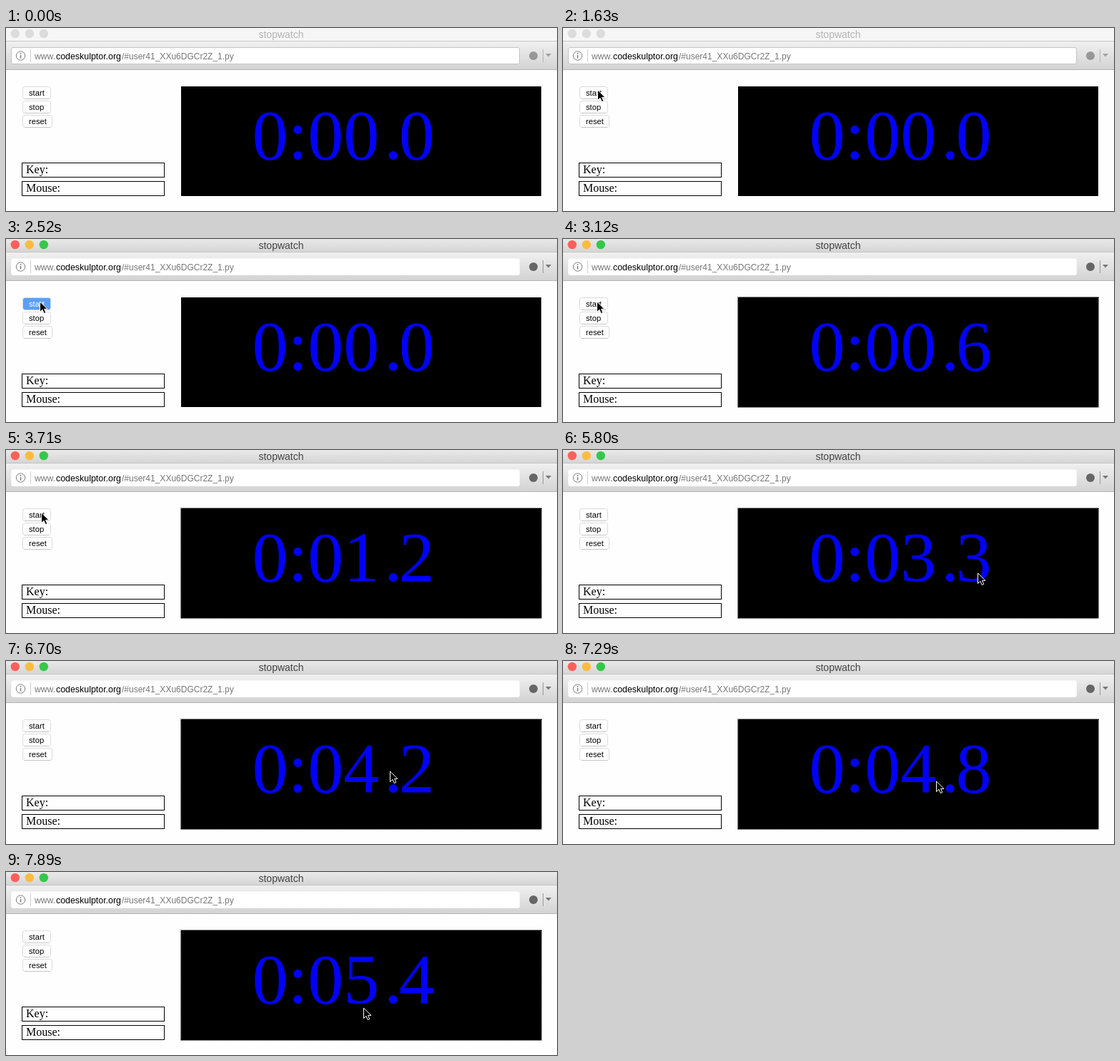
An HTML page that plays this animation: 771 px wide and 257 px high, repeating every 8000 ms.

```html
<!DOCTYPE html>
<html lang="en">
<head>
<meta charset="utf-8">
<title>stopwatch</title>
<style>
  html, body { margin: 0; width: 100%; height: 100%; overflow: hidden; background: #fefefe; }
  svg { display: block; width: 771px; height: 257px; }
  text { font-family: "Liberation Sans", Arial, sans-serif; white-space: pre; }
  .serif { font-family: "Liberation Serif", "Times New Roman", serif; }
</style>
</head>
<body>
<svg viewBox="0 0 771 257">
  <defs>
    <linearGradient id="titleFill" x2="0" y2="1">
      <stop offset="0" stop-color="#e9e9e9"/><stop offset="1" stop-color="#d5d5d5"/>
    </linearGradient>
    <linearGradient id="toolFill" x2="0" y2="1">
      <stop offset="0" stop-color="#f0f0f0"/><stop offset="1" stop-color="#d3d3d3"/>
    </linearGradient>
  </defs>
  <rect width="771" height="257" fill="#fefefe"/>

  <rect id="titleBar" width="771" height="18"/>
  <rect y="18" width="771" height="1" fill="#c6c6c6"/>
  <g id="lights"></g>
  <text id="title" x="385" y="13.5" font-size="14" text-anchor="middle">stopwatch</text>

  <rect y="19" width="771" height="39" fill="url(#toolFill)"/>
  <rect y="58" width="771" height="1" fill="#b5b5b5"/>
  <rect id="address" x="7.5" y="27.5" width="711" height="23" rx="2.5" fill="#fff"/>
  <circle cx="20.5" cy="39" r="6.2" fill="none" stroke="#7d7d7d"/>
  <path d="M20.5 35v1.8M20.5 38v4.6" stroke="#777" stroke-width="1.5"/>
  <path d="M34.5 30v18" stroke="#cfcfcf"/>
  <text y="44" fill="#777"><tspan x="40" font-size="12.2">www.</tspan><tspan x="70" font-size="12.4" fill="#000">codeskulptor.org</tspan><tspan x="162" font-size="12">/#user41_XXu6DGCr2Z_1.py</tspan></text>
  <g id="tools">
    <circle cx="738" cy="39" r="6" fill="#666"/>
    <path d="M751.5 30v18" stroke="#999"/>
    <path d="M755 36h8l-4 4.5z" fill="#777"/>
  </g>

  <g id="buttons"></g>
  <g fill="none" stroke="#000">
    <rect x="22.5" y="189.5" width="199" height="20"/>
    <rect x="22.5" y="215.5" width="199" height="20"/>
  </g>
  <g font-size="16">
    <text class="serif" x="28" y="204">Key:</text>
    <text class="serif" x="28" y="230">Mouse:</text>
  </g>

  <rect x="245" y="82" width="504" height="154"/>
  <rect id="focus" x="244.5" y="81.5" width="505" height="155" fill="none" stroke="#000" stroke-dasharray="1 1" stroke-dashoffset=".5"/>
  <text class="serif" x="344.5" y="183.5" font-size="100" fill="#00f"><tspan id="whole"></tspan><tspan dx="7">.</tspan><tspan id="tenth" dx="-4.5"></tspan></text>
  <path id="cursor" d="M.5 1V15.5L4 12.3L6.3 17.6L8.8 16.5L6.6 11.4H11Z" fill="#000" stroke="#fff"/>
</svg>
<script>
const $ = id => document.getElementById(id);
const set = (el, attrs) => { for (const k in attrs) el.setAttribute(k, attrs[k]); return el; };
const add = (parent, tag, attrs) =>
  parent.appendChild(set(document.createElementNS("http://www.w3.org/2000/svg", tag), attrs));

const LOOP = 8000, STEP = 149.27, FIRST = 270;
const ACTIVATE = 10, PRESS = 15;

// Pointer waypoints: step, x, y
const route = [
  [0, 336, 176], [7, 100, 91], [8, 60, 87], [9, 48, 86], [12, 48, 86], [13, 47, 87],
  [19, 47, 87], [22, 49, 87], [23, 49, 87], [25, 130, 100], [27, 420, 146], [29, 580, 172],
  [38, 580, 172], [42, 537, 154], [45, 537, 154], [50, 500, 190], [60, 500, 190]
];

const lights = ["#fc605b", "#fdbc40", "#34c84a"].map((color, i) => ({
  color, el: add($("lights"), "circle", { cx: 12.8 + 20 * i, cy: 8, r: 6.2 })
}));

const buttons = [["start", 39], ["stop", 39], ["reset", 41]].map(([label, width], i) => {
  const y = 83 + 20 * i;
  const body = add($("buttons"), "rect",
    { x: 23.5, y: y - .5, width, height: 17, rx: 3, fill: "#fff", stroke: "#dadada" });
  add($("buttons"), "path", { d: `M26 ${y + 16.5}h${width - 5}`, stroke: "#c4c4c4" });
  const text = add($("buttons"), "text", { x: 32, y: y + 12.3, "font-size": 11.2 });
  text.textContent = label;
  return { body, text };
});

function pointerAt(step) {
  const i = route.findIndex(p => p[0] > step);
  const [s0, x0, y0] = route[i - 1], [s1, x1, y1] = route[i];
  const u = (step - s0) / (s1 - s0);
  return [x0 + (x1 - x0) * u, y0 + (y1 - y0) * u].map(Math.round);
}

function showTenths(n) {
  const seconds = Math.floor(n / 10);
  $("whole").textContent = `${Math.floor(seconds / 60)}:${String(seconds % 60).padStart(2, "0")}`;
  $("tenth").textContent = n % 10;
}

function render(time) {
  const step = Math.floor((time - FIRST) / STEP);
  const active = step >= ACTIVATE, pressed = step === PRESS;

  set($("titleBar"), { fill: active ? "url(#titleFill)" : "#f6f6f6" });
  set($("title"), { fill: active ? "#444" : "#b3b3b3" });
  set($("address"), { stroke: active ? "#f8f8f8" : "#c4c4c4" });
  set($("tools"), { opacity: active ? 1 : .6 });
  for (const { color, el } of lights) set(el, { fill: active ? color : "#dcdcdc" });

  set(buttons[0].body, { fill: pressed ? "#5a9ff8" : "#fff" });
  set(buttons[0].text, { fill: pressed ? "#fff" : "#000" });
  set($("focus"), { visibility: active && !pressed ? "visible" : "hidden" });
  showTenths(Math.max(0, Math.floor(1.5 * (step - PRESS))));

  set($("cursor"), { visibility: step < 0 ? "hidden" : "visible" });
  if (step >= 0) set($("cursor"), { transform: `translate(${pointerAt(step)})` });
}

const begin = performance.now();
function tick() {
  render((performance.now() - begin) % LOOP);
  requestAnimationFrame(tick);
}
tick();
</script>
</body>
</html>
```
